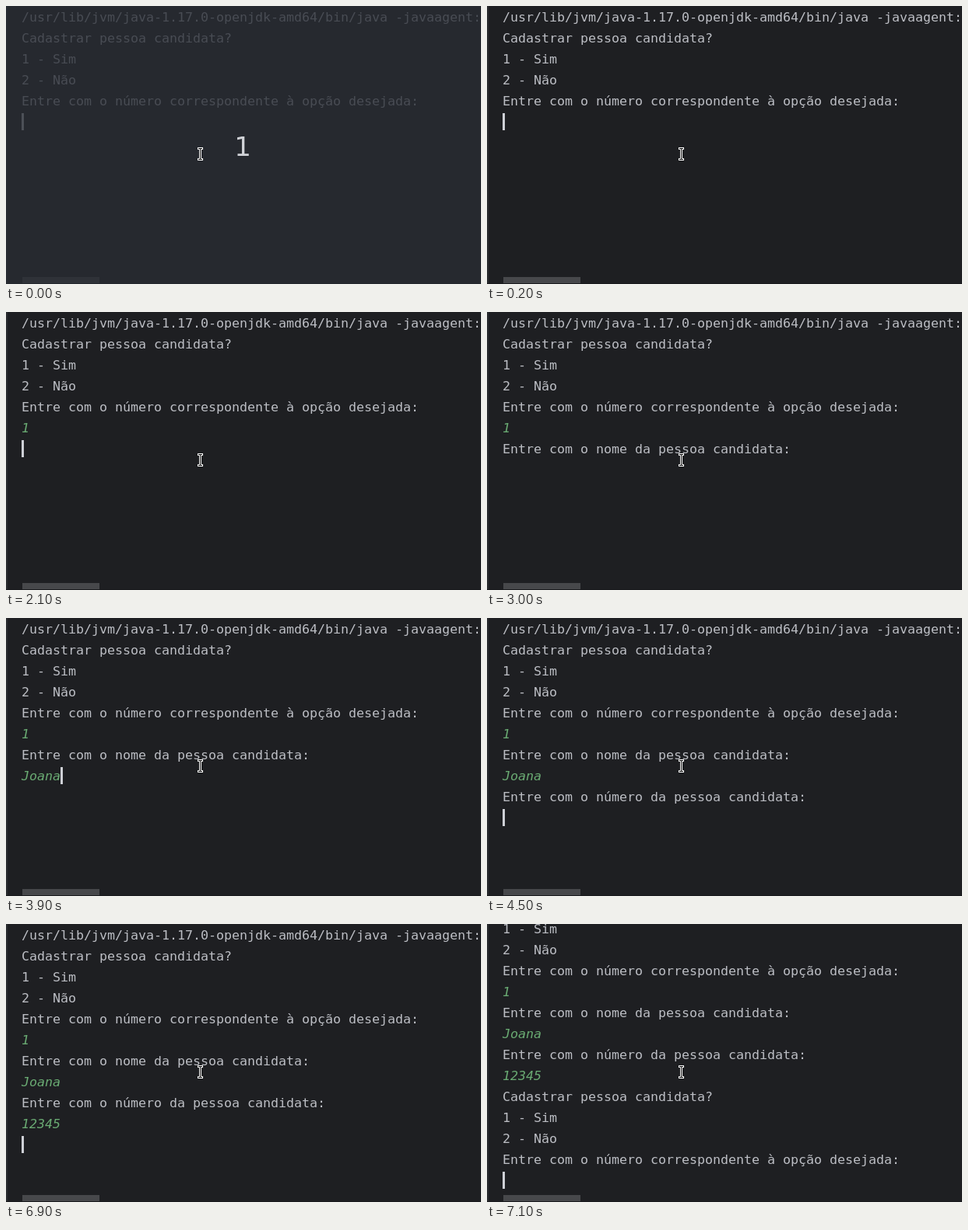
These frames come from a looping animation (610 px wide and 358 px high, 8000 ms). An HTML page with a canvas:

```html
<!DOCTYPE html>
<html lang="pt">
<head>
<meta charset="utf-8">
<title>Console</title>
<style>
html, body { margin: 0; width: 100%; height: 100%; overflow: hidden; background: #1e1f22; }
canvas { display: block; }
</style>
</head>
<body>
<canvas id="stage" width="610" height="358"></canvas>
<script>
const ctx = document.getElementById('stage').getContext('2d');
const LOOP = 8000, LEFT = 20, CHAR = 10, ROW = 27;
const MONO = '16.61px "DejaVu Sans Mono", monospace';
const DIM_END = 200, SCROLL_AT = 7100, SCROLL_BY = 62;

const menu = [
  'Cadastrar pessoa candidata?',
  '1 - Sim',
  '2 - Não',
  'Entre com o número correspondente à opção desejada:'
];

// Program output: [start time, first row, lines]
const output = [
  [0, 0, ['/usr/lib/jvm/java-1.17.0-openjdk-amd64/bin/java -javaagent:', ...menu]],
  [2300, 6, ['Entre com o nome da pessoa candidata:']],
  [4500, 8, ['Entre com o número da pessoa candidata:']],
  [SCROLL_AT, 10, menu]
];

// Text the user types, by row
const input = { 5: '1', 7: 'Joana', 9: '12345' };

// Caret: [start time, row, column, hidden]
const caretSteps = [
  [0, 5, 0], [500, 5, 0, true], [1200, 5, 0], [1600, 5, 0, true],
  [1800, 5, 1], [2100, 6, 0], [2300, 7, 0], [3000, 7, 0, true],
  [3500, 7, 2], [3700, 7, 4], [3900, 7, 5], [4400, 8, 0], [4500, 9, 0],
  [5200, 9, 1], [5400, 9, 2], [5600, 9, 3], [6000, 9, 4], [6200, 9, 5],
  [6900, 10, 0], [SCROLL_AT, 14, 0]
];

function rect(color, x, y, w, h) {
  ctx.fillStyle = color;
  ctx.fillRect(x, y, w, h);
}

function write(text, row, color, style = '') {
  ctx.font = style + MONO;
  ctx.fillStyle = color;
  ctx.fillText(text, LEFT, 20 + row * ROW);
}

function drawConsole(t) {
  const [, caretRow, caretCol, hidden] = caretSteps.findLast(step => step[0] <= t);
  ctx.save();
  if (t >= SCROLL_AT) ctx.translate(0, -SCROLL_BY);
  for (const [start, first, lines] of output) {
    if (t >= start) lines.forEach((line, i) => write(line, first + i, '#bcbec4'));
  }
  for (const [row, text] of Object.entries(input)) {
    if (row > caretRow) continue;
    const shown = row < caretRow ? text : text.slice(0, caretCol);
    write(shown, +row, '#6aab73', 'italic ');
  }
  if (!hidden) rect('#ced0d6', LEFT + caretCol * CHAR, 3 + caretRow * ROW, 3, 22);
  ctx.restore();
}

function drawPointer() {
  rect('#fff', 246, 182, 7, 3);
  rect('#fff', 248, 184, 3, 13);
  rect('#fff', 246, 196, 7, 3);
  rect('#111', 247, 183, 5, 1);
  rect('#111', 249, 183, 1, 15);
  rect('#111', 247, 197, 5, 1);
}

function drawCountdown() {
  rect('rgba(40, 44, 52, 0.78)', 0, 0, 610, 358);
  ctx.font = '34px "DejaVu Sans", sans-serif';
  ctx.textAlign = 'center';
  ctx.fillStyle = '#d0d2d7';
  ctx.fillText('1', 304, 193);
  ctx.textAlign = 'left';
}

function draw(t) {
  rect('#1e1f22', 0, 0, 610, 358);
  rect('#2b2d30', 0, 0, 2, 358);
  rect('#191a1d', 0, 357, 610, 1);
  rect('#47484b', 21, 349, 99, 8);
  drawConsole(t);
  if (t < DIM_END) drawCountdown();
  drawPointer();
}

const began = performance.now();
function tick() {
  draw((performance.now() - began) % LOOP);
  requestAnimationFrame(tick);
}
tick();
</script>
</body>
</html>
```
